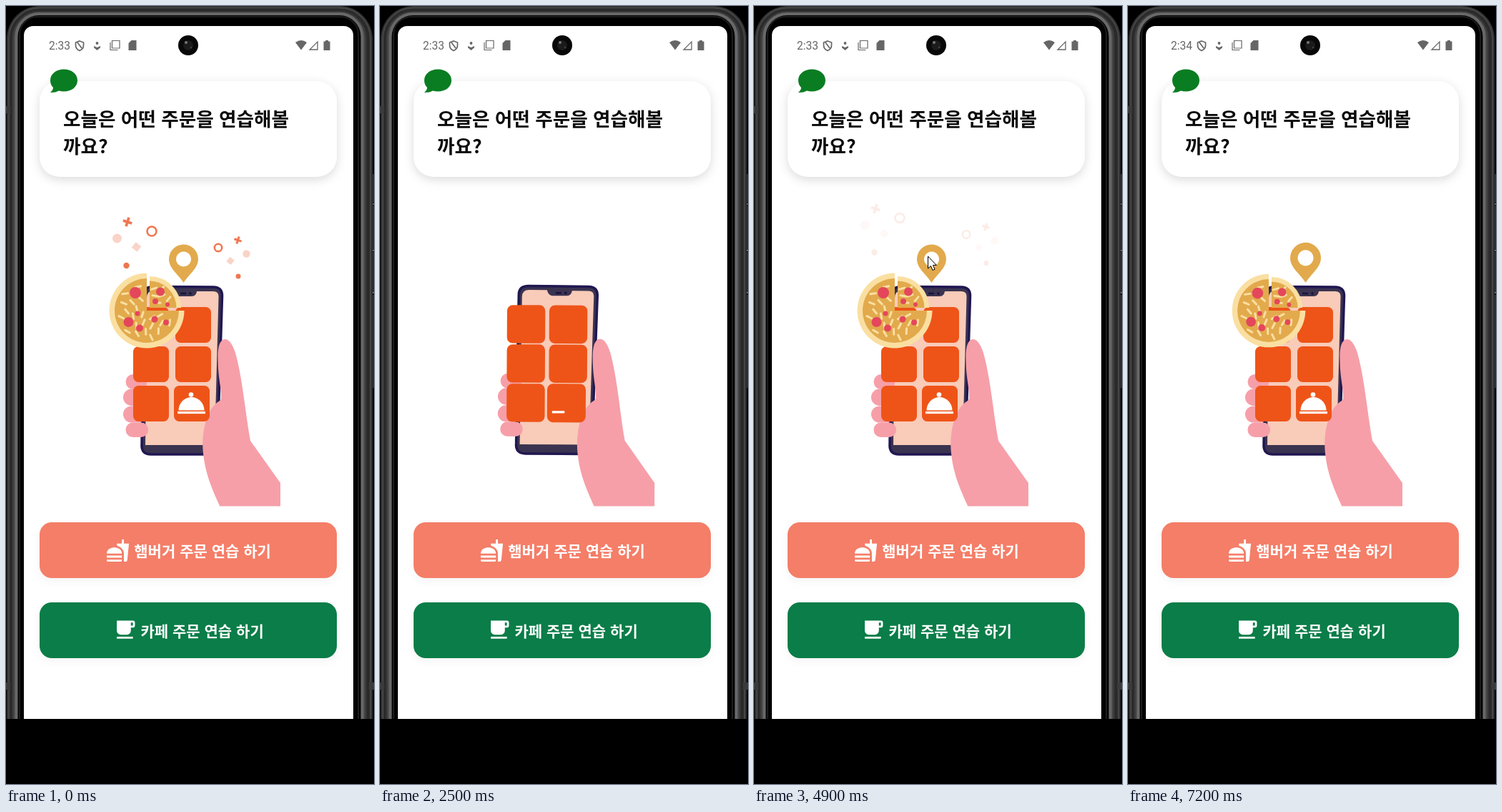
An HTML page for the animation above (7300 ms loop, 515 px wide and 1088 px high).

```html
<!DOCTYPE html>
<html lang="ko">
<head>
<meta charset="utf-8">
<style>
html, body { margin: 0; width: 100%; height: 100%; overflow: hidden; background: #000; }
svg { display: block; width: 515px; height: 1088px; }
.ko { font-family: "Noto Sans CJK KR", "Noto Sans CJK", sans-serif; font-weight: 700; }
.card { filter: drop-shadow(0 4px 7px rgba(0,0,0,.14)); }
.btn { filter: drop-shadow(0 5px 6px rgba(0,0,0,.04)); }
</style>
</head>
<body>
<svg viewBox="0 0 515 1088">
  <defs>
    <clipPath id="device"><rect width="515" height="997"/></clipPath>
    <clipPath id="scene"><rect x="26" y="260" width="460" height="439.5"/></clipPath>
  </defs>

  <g clip-path="url(#device)">
    <path d="M511 235h4v40h-4zM511 279h4v62h-4zM511 344h4v56h-4zM511 404h4v130h-4z" fill="#2b2b2b"/>
    <path d="M512 277h3M512 342h3M512 401h3" stroke="#888" stroke-width="1.5"/>
    <rect x="1" y="0" width="512" height="1100" rx="46" fill="#303030"/>
    <rect x="4" y="2.5" width="506" height="1100" rx="43" fill="#2a2a2a" stroke="#454545" stroke-width="2"/>
    <rect x="9.500" y="8" width="494" height="1100" rx="37" fill="#484848" stroke="#3a3a3a" stroke-width="2"/>
    <rect x="14.500" y="11" width="484" height="1100" rx="32" fill="#000" stroke="#686868" stroke-width="4"/>
    <rect x="19" y="15" width="474" height="1100" rx="25" fill="#000" stroke="#1c1c1c" stroke-width="2"/>
    <path d="M0 140h6v10H0zM0 946h6v10H0zM508 946h7v10h-7z" fill="#3a3a3a"/>
    <rect x="25" y="28" width="461" height="1000" rx="13" fill="#fff"/>
  </g>

  <g fill="#666">
    <text id="clock" x="60" y="60.5" font-family="Roboto, sans-serif" font-size="15.6"></text>
    <path d="M103 49l5.500 2v4q0 5-5.500 7.500-5.500-2.500-5.500-7.500v-4zM100 51l6 8" fill="none" stroke="#666" stroke-width="1.7"/>
    <circle cx="127.500" cy="52" r="1.900"/>
    <path d="M123 56l4.500 2 4.500-2v2.200l-4.500 3.800-4.500-3.800z"/>
    <path d="M148.500 48.500h10.500v10.500h-10.500zM146 51v10.500h10.500" fill="none" stroke="#666" stroke-width="1.2"/>
    <path d="M175.500 48h7v14h-11V52zM405 51q8-6 16 0l-8 10.500z"/>
    <path d="M436 50v11h-11z" fill="none" stroke="#666" stroke-width="1.3"/>
    <path d="M447 48h4v1.500h2.500V62h-9V49.500h2.500z"/>
  </g>
  <circle cx="255" cy="55" r="14" fill="#080808"/>
  <circle cx="255" cy="55" r="7" fill="#1b1b1b"/>
  <circle cx="252" cy="51" r="2" fill="#777"/>
  <circle cx="259" cy="58" r="1.200" fill="#444"/>

  <rect class="card" x="47" y="105" width="416" height="134" rx="28" fill="#fff"/>
  <path d="M81 88.500c11 0 19 6.500 19 15.500s-8 15.500-19 15.500q-4 0-7-1-5 3-12 2.500 4-3.500 4-7-4-4-4-10c0-9 8-15.500 19-15.500z" fill="#0a7d22"/>
  <g class="ko" font-size="26.600" fill="#0b0b0b">
    <text x="80" y="168">오늘은 어떤 주문을 연습해볼</text>
    <text x="80" y="206">까요?</text>
  </g>

  <g clip-path="url(#scene)">
    <g id="hand">
      <path d="M206 392.500L290 393Q303 393 302.500 406L296 615Q295 627 283 627L203 627Q189 627 190 613L192.500 405Q192.500 392.500 206 392.500Z" fill="#3b3450" stroke="#211751" stroke-width="3.500"/>
      <path d="M207 398H232Q234 406 240 406H260Q266 406 267 399H290Q298 399 297.500 407L292 614H195L197 408Q197 398 207 398Z" fill="#f9cbb9"/>
      <path d="M244 402h8" stroke="#191238" stroke-width="2.500"/><circle cx="258" cy="402" r="1.800" fill="#191238"/>
      <g fill="#f69fa9">
        <rect x="167.500" y="515" width="30" height="21" rx="10.500"/>
        <rect x="164" y="535.500" width="33" height="23.500" rx="11.700"/>
        <rect x="164" y="559.500" width="32" height="23" rx="11.500"/>
        <rect x="167.500" y="582.500" width="31.500" height="20.500" rx="10"/>
        <path d="M299 552C282 562 274 592 275.500 620C278 655 290 678 299 699L310 735H384V667L342 608C335 570 331 520 321 485C316 470 311 466 306 466C298 467 296 480 296.500 495C297 525 302 535 301 550Z"/>
      </g>
      <g id="tiles" fill="#ee5418"></g>
      <g fill="#fff">
        <rect id="plate" x="240" y="567" height="3.200"/>
        <g id="dome"><path d="M241.500 565.500a18 18.500 0 0 1 36 0z"/><circle cx="259" cy="543.500" r="3.300"/></g>
      </g>
    </g>
    <g id="pizza">
      <path d="M197 426V373.500A52.500 52.500 0 1 0 249.500 426Z" fill="#fadfa2"/>
      <path d="M197 426V381A45 45 0 1 0 242 426Z" fill="#e2aa4c"/>
      <path d="M201 422V378A44 44 0 0 1 245 422Z" fill="#fadfa2"/>
      <path d="M201 422V384.500A37.500 37.500 0 0 1 238.500 422Z" fill="#e2aa4c"/>
      <path id="cheese" stroke="#fadfa2" stroke-width="3" stroke-linecap="round"/>
      <g id="salami" fill="#e4475b"></g>
    </g>
    <path id="pin" fill-rule="evenodd" fill="#e2aa4c" d="M248.500 387C241 375 228 367 228 354A20.500 20.500 0 0 1 269 354C269 367 256 375 248.500 387ZM248.500 343.500a10.500 10.500 0 1 0 .01 0z"/>
    <g id="confetti"></g>
  </g>

  <rect class="btn" x="47" y="722" width="416" height="78" rx="17" fill="#f47e68"/>
  <rect class="btn" x="47" y="834" width="416" height="78" rx="17" fill="#0a7d48"/>
  <g fill="#fff">
    <path transform="translate(139.600 744.600) scale(1.410)" d="M18 23h1.700q1.500 0 1.700-1.500L23 5h-5V1h-2v4h-5l.3 2.400c1.700.5 3.300 1.300 4.300 2.300 1.400 1.400 2.400 2.900 2.400 5.300zM1 22v-1h15v1q0 1-1 1H2q-1 0-1-1zM16 15c0-8-15-8-15 0zM1 17h15v2H1z"/>
    <path transform="translate(149.400 855.200) scale(1.410)" fill-rule="evenodd" d="M20 3H4v10a4 4 0 0 0 4 4h6a4 4 0 0 0 4-4v-3h2a2 2 0 0 0 2-2V5a2 2 0 0 0-2-2zM20 8h-2V5h2zM4 19h16v2H4z"/>
    <g class="ko" font-size="21">
      <text x="179.300" y="769.500">햄버거 주문 연습 하기</text>
      <text x="188.500" y="881.500">카페 주문 연습 하기</text>
    </g>
  </g>
  <path id="cursor" d="M243.500 350v17l4-3.500 2.500 6 3-1.300-2.600-5.700h5z" fill="#fff" stroke="#000"/>
</svg>

<script>
const LOOP = 7300, CYCLE = 4030, SHIFT = 2427;
const $ = id => document.getElementById(id);
const ease = (t, from, to) => {
  const x = Math.min(1, Math.max(0, (t - from) / (to - from)));
  return (1 - Math.cos(Math.PI * x)) / 2;
};
// grows past full size, then settles
const pop = (t, start, rise, settle, peak) =>
  peak * ease(t, start, start + rise) - (peak - 1) * ease(t, start + rise, start + rise + settle);
const set = (el, name, value) => el.setAttribute(name, value);
const scaleAt = (el, x, y, s) =>
  set(el, 'transform', `translate(${x} ${y}) scale(${s}) translate(${-x} ${-y})`);

const tileSpots = [[203, 446], [262, 446], [203, 501], [262, 501], [203, 556], [260, 556]];
$('tiles').innerHTML = tileSpots.map(([x, y]) =>
  `<rect x="${x - 25}" y="${y - 25}" width="50" height="50" rx="7.5"/>`).join('');

$('salami').innerHTML = [[181, 401, 8], [216, 399.5, 6], [209, 413, 4], [226, 417.5, 3],
  [171.5, 442, 7], [184, 430, 3.5], [208, 438, 4.5], [224, 442.5, 4], [187, 450.5, 5]]
  .map(([x, y, r]) => `<circle cx="${x}" cy="${y}" r="${r}"/>`).join('');

let bits = '';
for (let i = 0; i < 36; i++) {
  const a = i * 2.4, r = 40 * Math.sqrt((i + .5) / 36), turn = i * 1.9;
  let x = r * Math.cos(a), y = r * Math.sin(a);
  const inSlice = x > 6 && y < -6;
  if (!inSlice && x > -5 && y < 5) continue;
  if (inSlice) { x = x * .85 + 4; y = y * .85 - 4; }
  const dx = 3.8 * Math.cos(turn), dy = 3.8 * Math.sin(turn);
  bits += `M${197 + x - dx} ${426 + y - dy}l${2 * dx} ${2 * dy}`;
}
set($('cheese'), 'd', bits);

// each takes x, y, size
const shapes = {
  cross: (x, y, s) => `<path d="M${x - s} ${y}h${2 * s}M${x} ${y - s}v${2 * s}" transform="rotate(18 ${x} ${y})" stroke="#ec6033" stroke-width="${s * .58}"/>`,
  ring: (x, y, s) => `<circle cx="${x}" cy="${y}" r="${s}" fill="none" stroke="#ec6033" stroke-width="2.6"/>`,
  dot: (x, y, s) => `<circle cx="${x}" cy="${y}" r="${s}" fill="#ec6033"/>`,
  pale: (x, y, s) => `<circle cx="${x}" cy="${y}" r="${s}" fill="#f9cdbf"/>`,
  square: (x, y, s) => `<rect x="${x - s}" y="${y - s}" width="${2 * s}" height="${2 * s}" transform="rotate(38 ${x} ${y})" fill="#f9cdbf"/>`
};
$('confetti').innerHTML = [['cross', 170, 302, 6.5], ['ring', 204, 315, 6.5], ['pale', 155.5, 325, 6.5],
  ['square', 182.5, 337, 4.8], ['dot', 168.5, 363, 4.2], ['cross', 324.5, 327.5, 5.3],
  ['ring', 297, 338, 5.2], ['pale', 336.5, 346.5, 5.2], ['square', 314, 356.5, 4], ['dot', 325, 378, 3.5]]
  .map(([kind, ...spot]) => shapes[kind](...spot)).join('');

function draw(t) {
  const q = (t + SHIFT) % CYCLE;

  const angle = -90 + 93 * ease(q, 0, 340) - 3 * ease(q, 340, 1050);
  set($('hand'), 'transform', `rotate(${angle} 384 712)`);
  tileSpots.forEach(([x, y], i) =>
    scaleAt($('tiles').children[i], x, y, pop(q, i < 5 ? 400 : 500, 400, 400, 1.08)));
  set($('plate'), 'width', 39 * ease(q, 800, 1010));
  scaleAt($('dome'), 259, 566, ease(q, 950, 1200));

  scaleAt($('pizza'), 197, 426, ease(q, 1250, 1602));
  scaleAt($('pin'), 248.5, 387, pop(q, 1200, 300, 250, 1.06));

  const burst = ease(q, 1650, 2050);
  const drift = 6.4 * (((4527 - q) / 1000) ** 2 - 4.41);
  set($('confetti'), 'transform',
    `translate(248 ${400 + drift}) scale(${burst}) translate(-248 -400)`);
  set($('confetti'), 'opacity', Math.min(1, Math.max(0, (3440 - q) / 1190)));

  $('clock').textContent = t < 6400 ? '2:33' : '2:34';
  set($('cursor'), 'visibility', t >= 4800 && t < 5000 ? 'visible' : 'hidden');
}

const start = performance.now();
function tick() {
  draw((performance.now() - start) % LOOP);
  requestAnimationFrame(tick);
}
tick();
</script>
</body>
</html>
```
